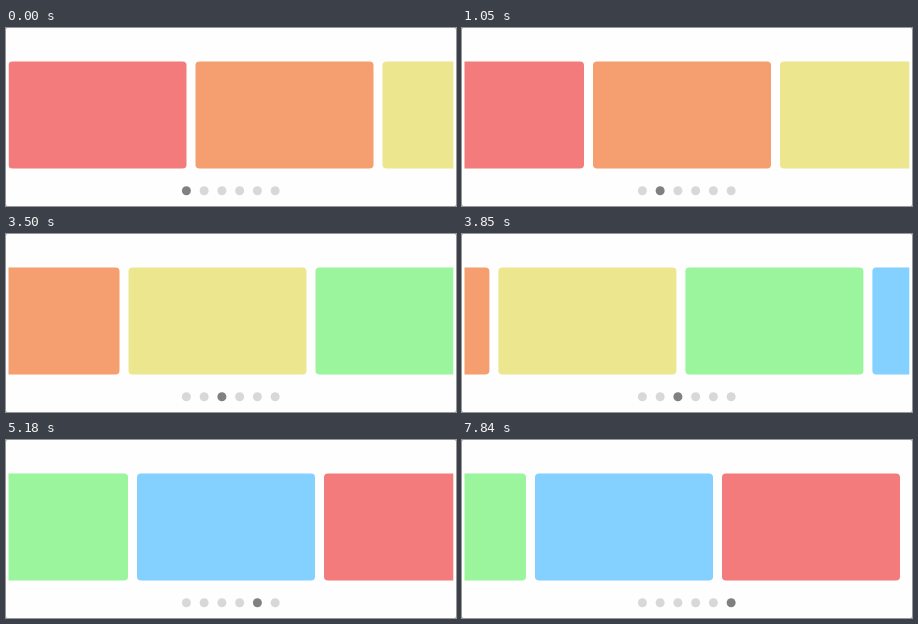
An HTML page with a canvas that plays this animation: 450x178 px, repeating every 8540 ms.

```html
<!DOCTYPE html>
<html lang="en">
<head>
<meta charset="utf-8">
<title>Snapping carousel</title>
<style>
  html, body { margin: 0; width: 100%; height: 100%; overflow: hidden; background: #888; }
  #stage { width: 450px; height: 178px; overflow: hidden; background: #fefefe; border-radius: 2px; }
  canvas { display: block; filter: blur(.4px); }
</style>
</head>
<body>
<div id="stage"><canvas width="450" height="178"></canvas></div>
<script>
const LOOP = 8540, STEP = 70;
const CARD = 178, GAP = 9, PITCH = CARD + GAP;
const LEFT = 2.5, RIGHT = 447.3, TOP = 33.6, HEIGHT = 106.8;
const colors = ['#f47b7b', '#f59e6f', '#ece68f', '#9bf59c', '#84d0ff', '#f47b7b'];
const last = colors.length - 1;

// Drag by some pixels over a number of steps, then snap to the next card.
const swipes = [
  { at: 8, drag: 6, by: 70, release: 14, snap: 2 },
  { at: 28, drag: 8, by: 110, release: 37, snap: 2 },
  { at: 50, drag: 7, by: 99, release: 57, snap: 2 },
  { at: 68, drag: 6, by: 104, release: 74, snap: 1 },
  { at: 87, drag: 3, by: 67, release: 94, snap: 2 },
  { at: 107, drag: 2, by: 9, release: 111, snap: 2 }
];

const ctx = document.querySelector('canvas').getContext('2d');
const clamp = (v, min, max) => Math.min(Math.max(v, min), max);
const snapPoint = i => clamp(i * PITCH - 128.5, 0, 677.5);

// Eased share of a move that starts at the given step.
function progress(step, start, length) {
  const p = clamp((step - start + 1) / length, 0, 1) ** 0.88;
  return p * p * (3 - 2 * p);
}

function stateAt(step) {
  let active = 0, pos = 0;
  for (const { at, drag, by, release, snap } of swipes) {
    pos += by * progress(step, at, drag);
    if (step < release) break;
    active = Math.min(active + 1, last);
    pos += (snapPoint(active) - pos) * progress(step, release, snap);
  }
  return { active, pos };
}

function drawCards(pos) {
  ctx.save();
  ctx.beginPath();
  ctx.rect(LEFT, 0, RIGHT - LEFT, 178);
  ctx.clip();
  colors.forEach((color, i) => {
    ctx.fillStyle = color;
    ctx.beginPath();
    ctx.roundRect(LEFT + i * PITCH - pos, TOP, CARD, HEIGHT, 4);
    ctx.fill();
  });
  ctx.restore();
}

function drawDots(active) {
  colors.forEach((_, i) => {
    ctx.fillStyle = i === active ? '#808080' : '#d8d8d8';
    ctx.beginPath();
    ctx.arc(180.4 + i * 17.75, 162.7, 4.5, 0, Math.PI * 2);
    ctx.fill();
  });
}

const origin = performance.now();
function draw() {
  const step = Math.floor((performance.now() - origin) % LOOP / STEP);
  const { active, pos } = stateAt(step);
  ctx.fillStyle = '#fefefe';
  ctx.fillRect(0, 0, 450, 178);
  drawCards(pos);
  drawDots(active);
  requestAnimationFrame(draw);
}
draw();
</script>
</body>
</html>
```
